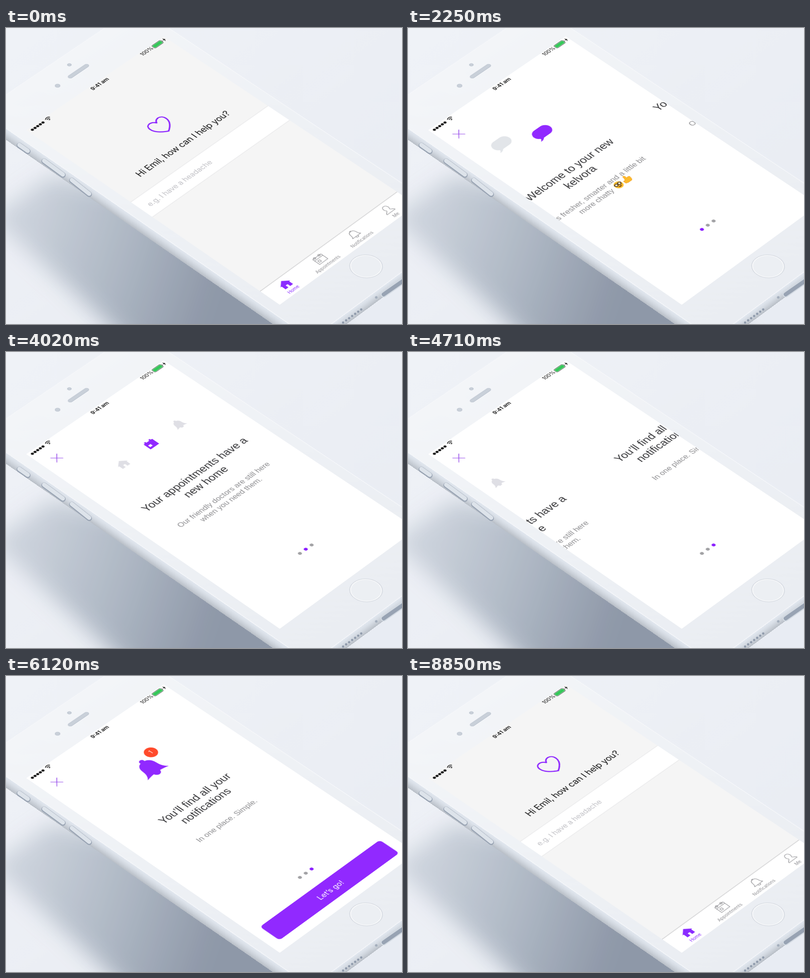
Write an HTML page that moves like this. It is 800 by 600 pixels and loops after 9.12 s.

```html
<!DOCTYPE html>
<html lang="en">
<head>
<meta charset="utf-8">
<title>Onboarding on a phone</title>
<style>
  html, body { margin: 0; width: 100%; height: 100%; overflow: hidden; background: #edf0f5; }
  #stage { position: relative; width: 800px; height: 600px; overflow: hidden; }
  #stage > * { position: absolute; left: 0; top: 0; }
  .slab { position: absolute; left: 0; top: 0; width: 423px; height: 867px; border-radius: 58px; }
  .slab, #phone { transform-origin: 0 0; }
  #phone { overflow: visible; }
  .ui { font-family: Inter, "Open Sans", sans-serif; }
  .title { font: 24px "Liberation Sans", Arial, sans-serif; fill: #333336; }
  .sub { font: 17px "Liberation Sans", Arial, sans-serif; fill: #8b8b8e; }
  .mid { text-anchor: middle; }
  .start { text-anchor: start; }
  .line { fill: none; stroke: #88888c; stroke-width: 1.1; stroke-linejoin: round; }
</style>
</head>
<body>
<div id="stage">
  <svg width="800" height="600">
    <defs>
      <linearGradient id="air" x1="0" y1="0" x2="1" y2="1">
        <stop offset="0" stop-color="#eff2f7"/><stop offset=".55" stop-color="#ebeef4"/><stop offset="1" stop-color="#e8ecf3"/>
      </linearGradient>
      <linearGradient id="shade" gradientUnits="userSpaceOnUse" x1="30" y1="410" x2="420" y2="540">
        <stop offset="0" stop-color="#c9d0da"/><stop offset=".5" stop-color="#aab4c1"/><stop offset="1" stop-color="#8791a2"/>
      </linearGradient>
      <filter id="soft" x="-30%" y="-30%" width="160%" height="160%"><feGaussianBlur stdDeviation="22"/></filter>
    </defs>
    <rect width="800" height="600" fill="url(#air)"/>
    <path d="M-30 385L90 300L240 330L700 640L270 660L120 520Z" fill="url(#shade)" opacity=".92" filter="url(#soft)"/>
  </svg>
  <div id="body"></div>
  <svg id="edges" width="800" height="600"></svg>

  <svg id="phone" width="375" height="667" viewBox="0 0 375 667">
    <defs>
      <linearGradient id="face" x1="0" y1="0" x2="0" y2="1">
        <stop offset="0" stop-color="#f3f5f8"/><stop offset=".5" stop-color="#eef1f5"/><stop offset="1" stop-color="#eaedf2"/>
      </linearGradient>
      <clipPath id="screen"><rect width="375" height="667"/></clipPath>
      <path id="house" d="M0 -11L13 0H10V10H2.500V3H-2.500V10H-10V0H-13Z"/>
      <g id="bell">
        <path d="M-28.500 1C-21 -6 -19 -13 -18.500 -23C-18 -36 -10 -42 0 -42C10 -42 18 -36 18.500 -23C19 -13 21 -6 28.500 1Q14 -3 0 -3Q-14 -3 -28.500 1Z"/>
        <circle cy="-43" r="5.500"/>
        <path d="M-8.500 -4A8.500 9 0 0 0 8.500 -4Z"/>
      </g>
      <path id="calendar" fill-rule="evenodd" d="M-11.500 -8H-8V-11H-4V-8H4V-11H8V-8H11.500V11H-11.500ZM-7.500 0V6H-1V0Z"/>
      <path id="bubble" d="M-9 -14H9A13.500 13.500 0 0 1 9 13H-8Q-13 18 -20 17Q-15 14 -15 11A13.500 13.500 0 0 1 -9 -14Z"/>
    </defs>

    <rect x="-24" y="-98" width="423" height="867" rx="58" fill="url(#face)" stroke="#f6f8fa" stroke-width="1.500"/>
    <g fill="#c9d0d9" stroke="#b4bdc9" stroke-width=".9">
      <rect x="161" y="-51" width="53" height="8.500" rx="4.200"/>
      <circle cx="130" cy="-46" r="4.800"/>
      <circle cx="188" cy="-72" r="3.800"/>
    </g>
    <circle cx="187" cy="711.500" r="30" fill="#eceff3" stroke="#d0d5dd" stroke-width="2.200"/>
    <circle cx="187" cy="711.500" r="29" fill="none" stroke="#fff" stroke-width="1.400"/>

    <g clip-path="url(#screen)">
      <rect width="375" height="667" fill="#f5f5f5"/>
      <g id="home" class="ui">
        <path transform="translate(190 173.500) scale(1.040)" d="M0 20C-10 14 -21 5 -21 -7C-21 -21 -5 -22 0 -11C5 -22 21 -21 21 -7C21 5 10 14 0 20Z" fill="none" stroke="#8a1fff" stroke-width="2.800" stroke-linejoin="round"/>
        <text class="mid" x="184.500" y="245" font-size="19.500" letter-spacing="-.35" fill="#111">Hi Emil, how can I help you?</text>
        <rect x="-1" y="280" width="377" height="57" fill="#fff" stroke="#dcdcde" stroke-width=".8"/>
        <text x="17.500" y="315" font-size="16.200" letter-spacing="-.15" fill="#c0c0c5">e.g. I have a headache</text>
      </g>
      <g class="ui">
        <rect x="-1" y="617" width="377" height="52" fill="#fff" stroke="#b4b4b7" stroke-width=".9"/>
        <use href="#house" x="47" y="637" fill="#8a2bff"/>
        <g class="line">
          <g transform="translate(140.500 637)"><path d="M-11 -8H11V10H-11ZM-11 -3H11M-7 1H-2V6H-7Z"/><circle cx="-6" cy="-8" r="2.200"/><circle cx="6" cy="-8" r="2.200"/></g>
          <path transform="translate(234 637)" d="M-11 7C-7 4 -8 -1 -7 -4C-6 -8 -3 -9 0 -9C3 -9 6 -8 7 -4C8 -1 7 4 11 7ZM-3 7A3 3.500 0 0 0 3 7M-1.500 -9A1.500 1.500 0 0 1 1.500 -9"/>
          <path transform="translate(327 636)" d="M-11 10C-11 5 -4 6 -4 2C-8 -2 -6 -10 0 -10C6 -10 8 -2 4 2C4 6 11 5 11 10Z"/>
        </g>
        <g class="mid" font-size="9.700" fill="#8e8e92">
          <text x="47" y="661" fill="#8a2bff">Home</text>
          <text x="140.500" y="661">Appointments</text>
          <text x="234" y="661">Notifications</text>
          <text x="328" y="661">Me</text>
        </g>
      </g>

      <g id="modal">
        <rect width="375" height="668" fill="#fff"/>
        <g id="pages">
          <g class="mid">
            <use id="greyBubble" href="#bubble" x="147" y="125" fill="#e2e5e9"/>
            <use id="purpleBubble" href="#bubble" fill="#9129ff"/>
            <text class="title" x="187" y="275">Welcome to your new</text>
            <text class="title" x="187" y="304.500">kelvora</text>
            <text class="sub" x="186" y="350">It’s fresher, smarter and a little bit</text>
            <text class="sub start" x="117" y="369">more chatty</text>
            <g transform="translate(223 362)">
              <circle r="9.500" fill="#fdc02f"/>
              <path d="M-9 -3H9" stroke="#3b2a1c" stroke-width="1.500"/>
              <g fill="#fff3d0" stroke="#3b2a1c" stroke-width="1.500"><circle cx="-4" cy="-2" r="3.200"/><circle cx="4" cy="-2" r="3.200"/></g>
              <path d="M-5 3.500Q0 9 5 3.500Z" fill="#7a4312"/>
            </g>
            <path transform="translate(245 362)" d="M-9 0H-5C-2 -3 -2 -6 -1 -10C3 -11 4 -7 2 -3H8C10 -2 10 0 8.500 1C9.500 3 8 4.500 7.500 5C8 7 6 8.500 4 8.500H-4L-9 7Z" fill="#fdbb2c" stroke="#ee9a1c" stroke-width=".8"/>
          </g>
          <g class="mid" transform="translate(375)">
            <g id="greyIcons" fill="#dfdfe5">
              <use href="#house" x="111" y="149.500"/>
              <use href="#bell" transform="translate(265.500 157) scale(.47)"/>
            </g>
            <use id="purpleCalendar" href="#calendar" x="188.500" y="148" fill="#9129ff"/>
            <text class="title" x="187" y="275">Your appointments have a</text>
            <text class="title" x="187" y="304.500">new home</text>
            <text class="sub" x="186" y="350">Our friendly doctors are still here</text>
            <text class="sub" x="186" y="369">when you need them.</text>
          </g>
          <g class="mid" transform="translate(750)">
            <use id="bigBell" href="#bell" fill="#9129ff"/>
            <g id="badge">
              <circle cx="219.500" cy="118" r="13.700" fill="#ff4a2b"/>
              <text class="ui" x="219.500" y="122.500" font-size="13" fill="#fff">1</text>
            </g>
            <text class="title" x="187" y="275">You’ll find all your</text>
            <text class="title" x="187" y="304.500">notifications</text>
            <text class="sub" x="186" y="358">In one place. Simple.</text>
          </g>
        </g>
        <path d="M24.800 40.400l17.200 17.200m0 -17.200l-17.200 17.200" stroke="#8a35e8" stroke-width="1.300"/>
        <g id="dots"></g>
        <g id="button">
          <rect x="23.500" y="594" width="328" height="50" rx="7" fill="#9129ff"/>
          <text id="go" class="mid ui" x="187" y="626" font-size="16.500" fill="#fff">Let’s go!</text>
        </g>
      </g>

      <g class="ui" fill="#111">
        <g id="signal"></g>
        <path d="M46 5.500Q52 0 58 5.500M48.300 8Q52 4.500 55.700 8" fill="none" stroke="#111" stroke-width="1.500"/>
        <circle cx="52" cy="10.300" r="1.500"/>
        <text class="mid" x="191" y="11.500" font-size="12" font-weight="600">9:41 am</text>
        <text class="mid" x="321" y="11" font-size="12" letter-spacing="-.2">100%</text>
        <rect x="338.500" y="2.500" width="24" height="10" rx="2" fill="none" stroke="#333" stroke-width=".8"/>
        <rect x="339.500" y="3.500" width="22" height="8" rx="1.200" fill="#35c759"/>
        <path d="M363.500 5.500v4q2 -2 0 -4ZM370 2L366.300 8H368.800L367.500 12.500L372 6.300H369.300Z"/>
      </g>
    </g>
  </svg>
</div>

<script>
const LOOP = 9120;
const SVG = "http://www.w3.org/2000/svg";
const $ = id => document.getElementById(id);

function add(parent, tag, attrs) {
  const el = document.createElementNS(SVG, tag);
  for (const key in attrs) el.setAttribute(key, attrs[key]);
  return parent.appendChild(el);
}

// Projective matrix taking a w by h rectangle to four stage corners.
function project(w, h, [x0, y0], [x1, y1], [x2, y2], [x3, y3]) {
  const ax = x1 - x2, ay = y1 - y2, bx = x3 - x2, by = y3 - y2;
  const sx = x0 - x1 + x2 - x3, sy = y0 - y1 + y2 - y3;
  const det = ax * by - bx * ay;
  const g = (sx * by - bx * sy) / det, k = (ax * sy - sx * ay) / det;
  return `matrix3d(${[
    (x1 - x0 + g * x1) / w, (y1 - y0 + g * y1) / w, 0, g / w,
    (x3 - x0 + k * x3) / h, (y3 - y0 + k * y3) / h, 0, k / h,
    0, 0, 1, 0, x0, y0, 0, 1].join()})`;
}

const tilt = project(375, 667, [41, 207], [318.5, 17], [829.5, 358.5], [553, 561]);
$("phone").style.transform = tilt;

// The thickness of the case is a stack of thin slabs, darker towards the back.
const DEPTH = 23;
for (let i = DEPTH; i > 0; i--) {
  const slab = document.createElement("div");
  const light = 232 - 40 * Math.pow(i / DEPTH, 1.5);
  slab.className = "slab";
  slab.style.background = `rgb(${light - 7},${light - 1},${light + 7})`;
  slab.style.transform = `translateY(${i}px) ${tilt} translate(-24px,-98px)`;
  $("body").append(slab);
}

function caseLine(x1, y1, x2, y2, width, color) {
  add($("edges"), "line", { x1, y1, x2, y2, stroke: color, "stroke-width": width, "stroke-linecap": "round" });
}
for (const [x1, y1, x2, y2] of [[27, 237, 44, 249], [77, 269, 115, 297], [133, 308, 168, 336]]) {
  caseLine(x1, y1 + 1, x2, y2 + 1, 11, "#97a2b2");
  caseLine(x1, y1, x2, y2, 8.5, "#dde3ea");
}
caseLine(763, 540, 806, 510, 12, "#d3dae2");
caseLine(763, 540, 806, 510, 8, "#98a3b3");
add($("edges"), "circle", { cx: 748, cy: 546, r: 2.6, fill: "#a4aebc" });
for (let i = 0; i < 7; i++)
  add($("edges"), "circle", { cx: 681 + i * 6.1, cy: 597 - i * 4.4, r: 2.3, fill: "#8f9aab" });

for (let i = 0; i < 5; i++)
  add($("signal"), "circle", { cx: 9 + i * 7.1, cy: 7.5, r: 2.9 });
const dots = [0, 1, 2].map(i => add($("dots"), "circle", { cx: 171.5 + i * 16, cy: 556.5, r: 3.7 }));

const ramp = (t, from, to) => Math.min(1, Math.max(0, (t - from) / (to - from)));
const smooth = p => p * p * (3 - 2 * p);
const easeOut = p => 1 - Math.pow(1 - p, 3);
const move = (id, x, y, scale = 1) =>
  $(id).setAttribute("transform", `translate(${x} ${y}) scale(${scale})`);
const fade = (id, opacity) => $(id).setAttribute("opacity", opacity);

function draw(t) {
  move("home", 0, t < LOOP / 2 ? 0 : -33);
  move("modal", 0, 668 * (1 - easeOut(ramp(t, 30, 600)) + smooth(ramp(t, 7410, 8220))));

  const page = smooth(ramp(t, 2040, 2775)) + smooth(ramp(t, 4290, 5025));
  move("pages", -375 * page, 0);
  dots.forEach((dot, i) => dot.setAttribute("fill", i === Math.round(page) ? "#8a1fff" : "#a2a2a5"));

  fade("greyBubble", ramp(t, 480, 660));
  move("purpleBubble", 224, 158, easeOut(ramp(t, 930, 1380)));
  fade("greyIcons", ramp(t, 2700, 2940));
  fade("purpleCalendar", ramp(t, 2820, 3180));

  move("bigBell", 188, 167.5, easeOut(ramp(t, 4800, 5220)));
  fade("badge", ramp(t, 5220, 5340));
  move("button", 0, t < 5220 ? 75 : 75 * Math.exp((5220 - t) / 112));
  fade("go", t < 7410 ? 1 : 0.3);
}

function tick() {
  draw(performance.now() % LOOP);
  requestAnimationFrame(tick);
}
tick();
</script>
</body>
</html>
```
